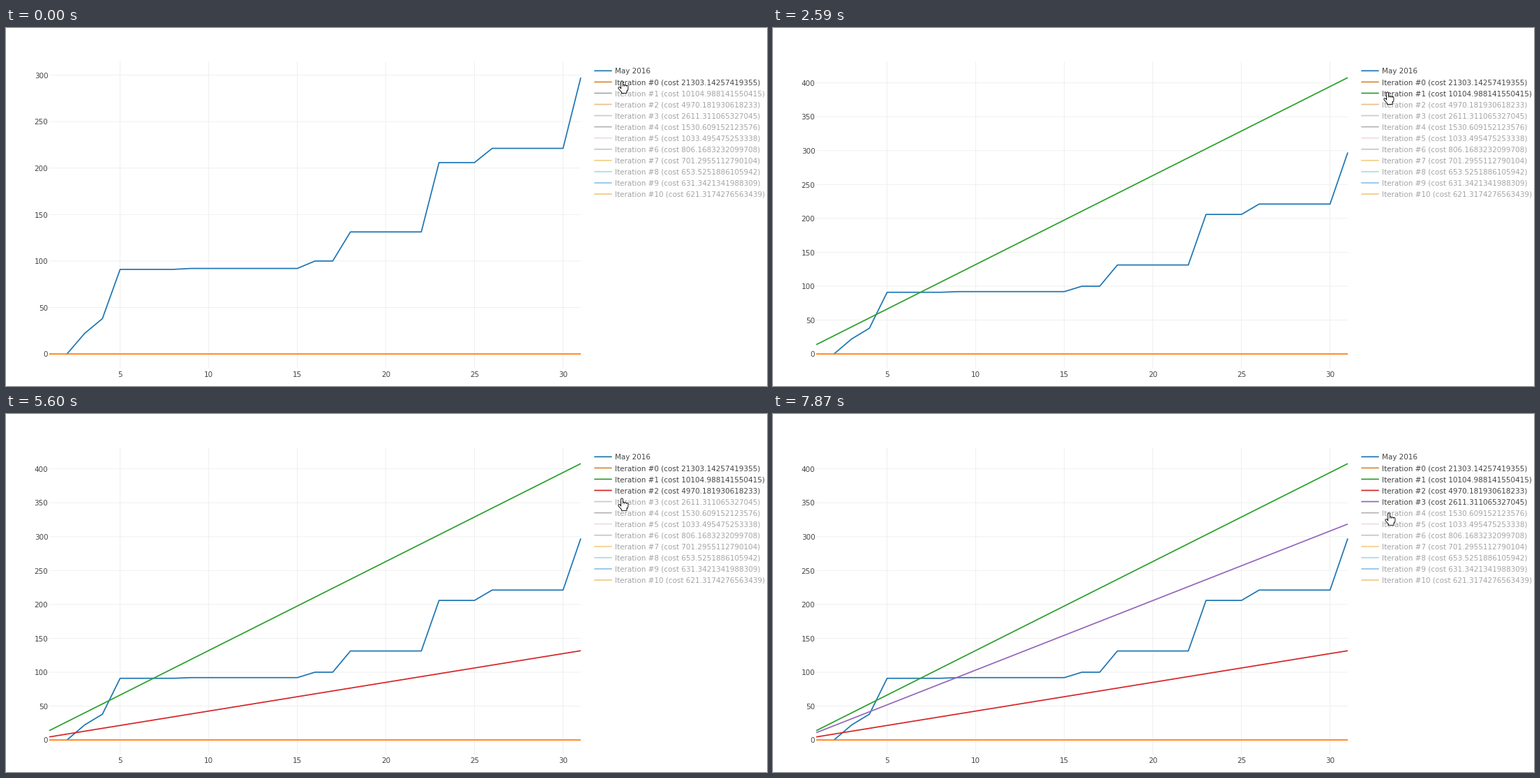
A matplotlib script that plays this animation: 1091 px wide and 513 px high, repeating every 8000 ms.

```python
import numpy as np
import matplotlib.pyplot as plt
from matplotlib.animation import FuncAnimation

W, H, DPI = 1091, 513, 64
PX = 72 / DPI                      # points per pixel
STEP, LOOP = 40, 8000
LEFT, RIGHT, TOP, BOTTOM = 62, 824, 48, 488
ZERO, PEAK = 467.1, 71.1           # heights of the value 0 and of the largest value
DARK, PALE, GRID = "#444444", "#a4a4a4", "#eeeeee"

COSTS = ["21303.14257419355", "10104.988141550415", "4970.181930618233",
         "2611.311065327045", "1530.609152123576", "1033.495475253338",
         "806.1683232099708", "701.2955112790104", "653.5251886105942",
         "631.3421341988309", "621.3174276563439"]
MUTED = ["#dd8a33", "#a8a8a8", "#e8c18c", "#cbcbcb", "#b8b3b8", "#efdbe1",
         "#c6c6c6", "#f1d184", "#a9dbef", "#92c1e6", "#f0ca86"]
CLICKS = {1: 2590, 2: 4980, 3: 7060}     # iteration: time it is switched on

# pointer moves: (start, duration, new top)
MOVES = [(50, 190, 80), (430, 430, 85), (1120, 1, 87), (1610, 1, 91), (3030, 1, 96),
         (3190, 170, 109), (5390, 700, 124), (7190, 1, 133), (7700, 170, 141)]

# running total of what was spent on single days of the month
PURCHASES = {3: 22.2, 4: 15.8, 5: 53, 9: 1, 16: 8, 18: 31.3, 23: 74.6, 26: 15.3, 31: 76.1}
days = np.arange(1, 32)
spend = np.cumsum([PURCHASES.get(day, 0) for day in days])


def gradient_descent(count, rate=.00498):
    """Straight lines fitted to the spending, one per iteration."""
    base = slope = 0
    for _ in range(count):
        yield base + slope * days
        error = base + slope * days - spend
        base -= rate * error.mean()
        slope -= rate * (error * days).mean()


fits = list(gradient_descent(len(CLICKS) + 1))

plt.rcParams["font.family"] = "DejaVu Sans"
fig = plt.figure(figsize=(W / DPI, H / DPI), dpi=DPI, facecolor="white")
ax = fig.add_axes([0, 0, 1, 1])
ax.set(xlim=(0, W), ylim=(H, 0))
ax.axis("off")


def stroke(x, y, color, width=1.75, cap="butt", **kw):
    return ax.plot(x, y, color=color, lw=width * PX, solid_capstyle=cap,
                   solid_joinstyle="round", snap=False, **kw)[0]


def label(x, y, text, color=DARK, ha="left"):
    return ax.text(x, y, text, color=color, ha=ha, va="baseline", fontsize=10.35 * PX)


def day_x(day):
    return LEFT + (RIGHT - LEFT) * (day - 1) / 30


def value_y(value, largest):
    return ZERO - (ZERO - PEAK) * value / largest


def value_axis(last, largest):
    artists = []
    for value in range(0, last + 1, 50):
        y = value_y(value, largest)
        artists += [stroke([LEFT, RIGHT], [y, y], GRID, .9, zorder=1),
                    label(60.3, y + 4.2, str(value), ha="right")]
    return artists


for day in range(5, 31, 5):
    x = day_x(day)
    stroke([x, x], [TOP, BOTTOM], GRID, .9, zorder=1)
    label(x, 500, str(day), ha="center")

low, high = spend.max(), fits[1].max()
low_axis, high_axis = value_axis(300, low), value_axis(400, high)
spend_line = stroke(day_x(days[1:]), value_y(spend[1:], low), "C0", zorder=2)
fit_lines = [stroke(day_x(days), value_y(fit, high), f"C{n + 1}", zorder=3)
             for n, fit in enumerate(fits)]


def legend_row(row, text, color, text_color=PALE):
    y = 61.3 + 16.06 * row
    return (stroke([843.3, 868.7], [y, y], color),
            label(873, y + 3.8, text, text_color))


legend_row(0, "May 2016", "C0", DARK)
legend = [legend_row(n + 1, f"Iteration #{n} (cost {cost})", MUTED[n])
          for n, cost in enumerate(COSTS)]
legend[0][1].set_color(DARK)


def bones(*segments):
    """Separate segments joined into one path with gaps."""
    gap = (np.nan, np.nan)
    return np.array([point for a, b in segments for point in (a, b, gap)])


fingers = bones(((6, 2.2), (6, 13)), ((2.2, 11), (6, 15.5)),
                *(((6 + 2.5 * k, 7.2 + .5 * k), (6 + 2.5 * k, 13)) for k in (1, 2, 3)))
palm = bones(((9.7, 10), (9.7, 16)), ((9.2, 14), (9.2, 18.8)))
hand = [(part, stroke([], [], color, width, cap, zorder=layer))
        for part, color, width, cap, layer in [
            (fingers, "black", 3.7, "round", 6), (palm, "black", 8.4, "butt", 6),
            (fingers, "white", 1.9, "round", 7), (palm - (0, .9), "white", 6.6, "butt", 7)]]


def pointer(now):
    top = 75
    for start, duration, goal in MOVES:
        left = 1 - np.clip((now - start) / duration, 0, 1)
        top += (goal - top) * (1 - left ** 3)
    # the path bows to the left on its way down to the third row
    bow = 2 * np.sin(np.pi * np.clip((top - 75) / 34, 0, 1))
    return np.round([877 - bow, top])


def update(frame):
    now = frame * STEP + STEP - 10
    for n, start in CLICKS.items():
        on = now >= start
        fit_lines[n].set_visible(on)
        key, text = legend[n]
        key.set_color(f"C{n + 1}" if on else MUTED[n])
        text.set_color(DARK if on else PALE)

    rescaled = now >= CLICKS[1]
    spend_line.set_ydata(value_y(spend[1:], high if rescaled else low))
    for artist in low_axis:
        artist.set_visible(not rescaled)
    for artist in high_axis:
        artist.set_visible(rescaled)

    corner = pointer(now)
    for part, line in hand:
        line.set_data(*(part + corner).T)
    return []


anim = FuncAnimation(fig, update, frames=LOOP // STEP, interval=STEP,
                     repeat=True, repeat_delay=0, blit=False)
plt.show()
```
